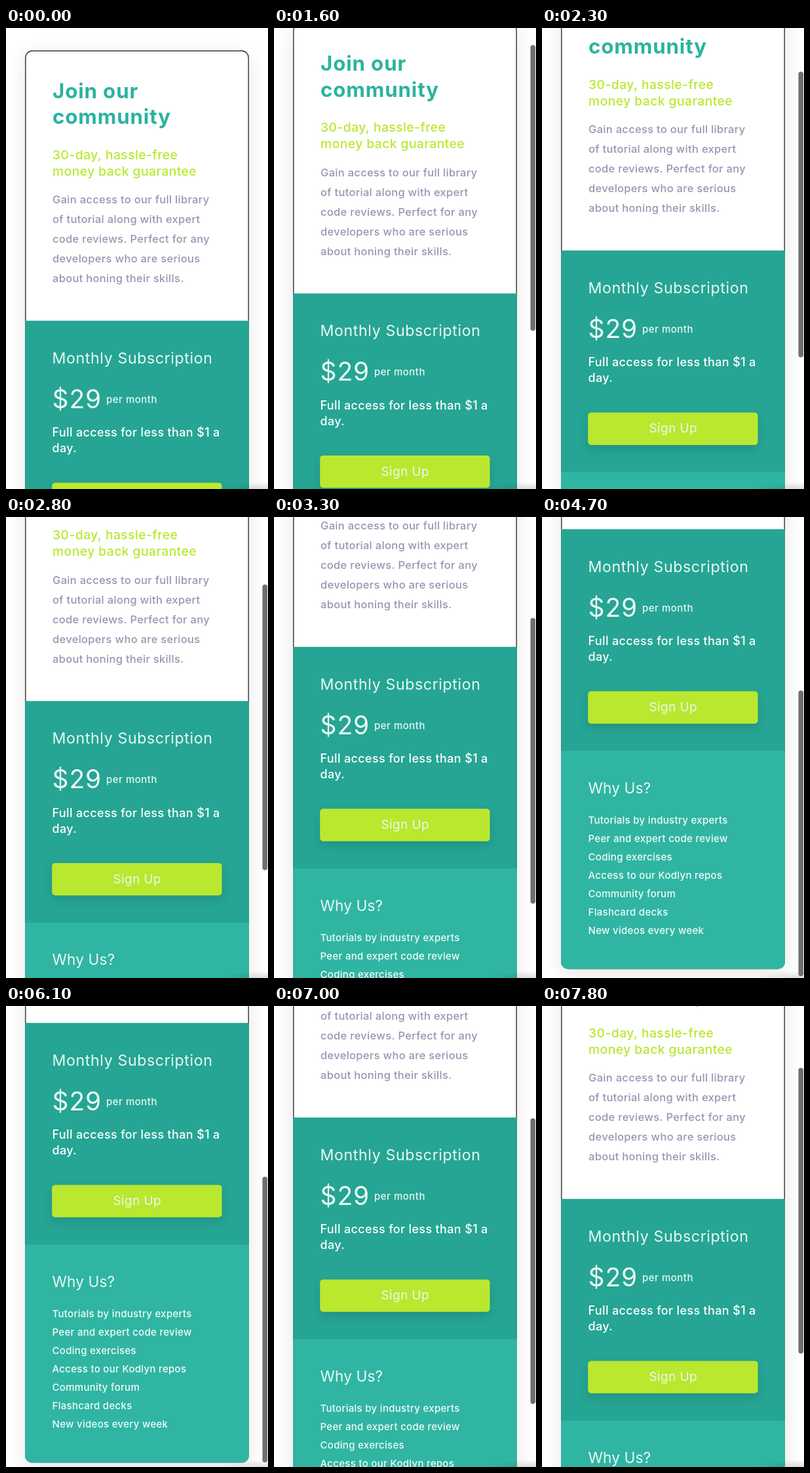
Animation, 400 px wide and 702 px high, one loop 8 s. Source, as an HTML page with a canvas:

```html
<!DOCTYPE html>
<html lang="en">
<head>
<meta charset="utf-8">
<title>Subscription card</title>
<style>
  html, body { margin: 0; width: 100%; height: 100%; overflow: hidden; background: #fff; }
  canvas { display: block; }
</style>
</head>
<body>
<canvas id="stage" width="400" height="702"></canvas>
<script>
const W = 400, H = 702, LOOP = 8000, STEP = 100;
const ctx = document.getElementById('stage').getContext('2d');

const LIME = '#b9e82f', TEAL = '#26a594', MINT = '#30b5a3', GREY = '#9298b0', PALE = '#e9f8f4';
const CARD = { x: 29.2, y: 34.3, w: 341.6, h: 1081, r: 10 };
const PRICE_TOP = 445.7, WHY_TOP = 783.2;

// [time ms, scroll px, speed px/s]
const SCROLL = [
  [1600, 41.5, 90], [2800, 165.5, 135], [3900, 356, 160], [4800, 428, 0],
  [5600, 428, 0], [6100, 420, -45], [7000, 276, -165], [7800, 152, -150]
];

function scrollAt(t) {
  if (t < SCROLL[0][0]) return 0;
  const i = SCROLL.findIndex(key => key[0] > t);
  if (i < 0) return SCROLL[SCROLL.length - 1][1];
  const [t0, s0, v0] = SCROLL[i - 1], [t1, s1, v1] = SCROLL[i];
  const u = (t - t0) / (t1 - t0), sec = (t1 - t0) / 1000;
  const ease = u * u * (3 - 2 * u);
  return s0 + (s1 - s0) * ease
    + sec * (v0 * u * (1 - u) ** 2 - v1 * u * u * (1 - u));
}

function thumbAlpha(t) {
  if (t < 1600) return 0;
  if (t < 5000 || t >= 5600) return 1;
  return Math.max(0, 1 - (t - 4900) / 400);
}

function roundRect(x, y, w, h, r, fill) {
  ctx.beginPath();
  ctx.roundRect(x, y, w, h, r);
  ctx.fillStyle = fill;
  ctx.fill();
}

function withShadow(color, blur, dy, draw) {
  ctx.save();
  ctx.shadowColor = color;
  ctx.shadowBlur = blur;
  ctx.shadowOffsetY = dy;
  draw();
  ctx.restore();
}

function write(lines, x, y, pitch, size, spacing, color, weight = 500) {
  ctx.font = `${weight} ${size}px Inter, sans-serif`;
  ctx.letterSpacing = spacing + 'px';
  ctx.fillStyle = color;
  lines.forEach((line, i) => ctx.fillText(line, x, y + i * pitch));
}

function drawCard() {
  const { x, y, w, h, r } = CARD;
  withShadow('rgba(0,0,0,0.1)', 30, 8, () => roundRect(x, y, w, h, r, '#fff'));

  ctx.beginPath();
  ctx.roundRect(x + 0.6, y + 0.6, w - 1.2, h - 1.2, r);
  ctx.strokeStyle = '#111';
  ctx.lineWidth = 1.2;
  ctx.stroke();
  roundRect(x, PRICE_TOP, w, y + h - PRICE_TOP, [0, 0, r, r], TEAL);
  roundRect(x, WHY_TOP, w, y + h - WHY_TOP, [0, 0, r, r], MINT);

  write(['Join our', 'community'], 71, 106.7, 39.3, 31.3, 0.85, '#2bb3a0', 700);
  write(['30-day, hassle-free', 'money back guarantee'], 71, 199.7, 25, 19.3, 0.45, LIME);
  write([
    'Gain access to our full library',
    'of tutorial along with expert',
    'code reviews. Perfect for any',
    'developers who are serious',
    'about honing their skills.'
  ], 71, 267, 30, 16.5, 0.3, GREY);

  write(['Monthly Subscription'], 70.5, 510.7, 0, 23.2, 0.6, PALE, 400);
  write(['$29'], 70.5, 578.7, 0, 39, 0.9, PALE, 400);
  write(['per month'], 153, 570.7, 0, 15, 0.5, PALE);
  write(['Full access for less than $1 a', 'day.'], 70.5, 622.3, 24, 18, 0.35, '#fff');

  withShadow('rgba(0,0,0,0.13)', 15, 6, () => roundRect(70.2, 692.4, 259.4, 49.4, 5, LIME));
  write(['Sign Up'], 163.5, 723.3, 0, 19, 0.4, PALE, 400);

  write(['Why Us?'], 70.5, 847.7, 0, 22.7, 0.1, PALE, 400);
  write([
    'Tutorials by industry experts',
    'Peer and expert code review',
    'Coding exercises',
    'Access to our Kodlyn repos',
    'Community forum',
    'Flashcard decks',
    'New videos every week'
  ], 70.5, 893.7, 28, 15, 0.3, '#f2fbf9');
}

function drawBottomShade() {
  const shade = ctx.createRadialGradient(0, 0, 0, 0, 0, 1);
  shade.addColorStop(0, 'rgba(0,0,0,0.14)');
  shade.addColorStop(1, 'rgba(0,0,0,0)');
  ctx.save();
  ctx.translate(W, H);
  ctx.scale(75, 11);
  ctx.fillStyle = shade;
  ctx.fillRect(-1, -1, 1, 1);
  ctx.restore();
}

function render(t) {
  const scroll = scrollAt(t);
  ctx.fillStyle = '#fff';
  ctx.fillRect(0, 0, W, H);

  ctx.save();
  ctx.translate(0, -scroll);
  drawCard();
  ctx.restore();

  drawBottomShade();
  ctx.globalAlpha = thumbAlpha(t);
  roundRect(391.5, 0.4 + scroll * 0.618, 7.5, 435, 3.75, '#6f6f6f');
  ctx.globalAlpha = 1;
}

const start = performance.now();
function tick() {
  const t = (performance.now() - start) % LOOP;
  render(Math.floor(t / STEP) * STEP);
  requestAnimationFrame(tick);
}
tick();
</script>
</body>
</html>
```
